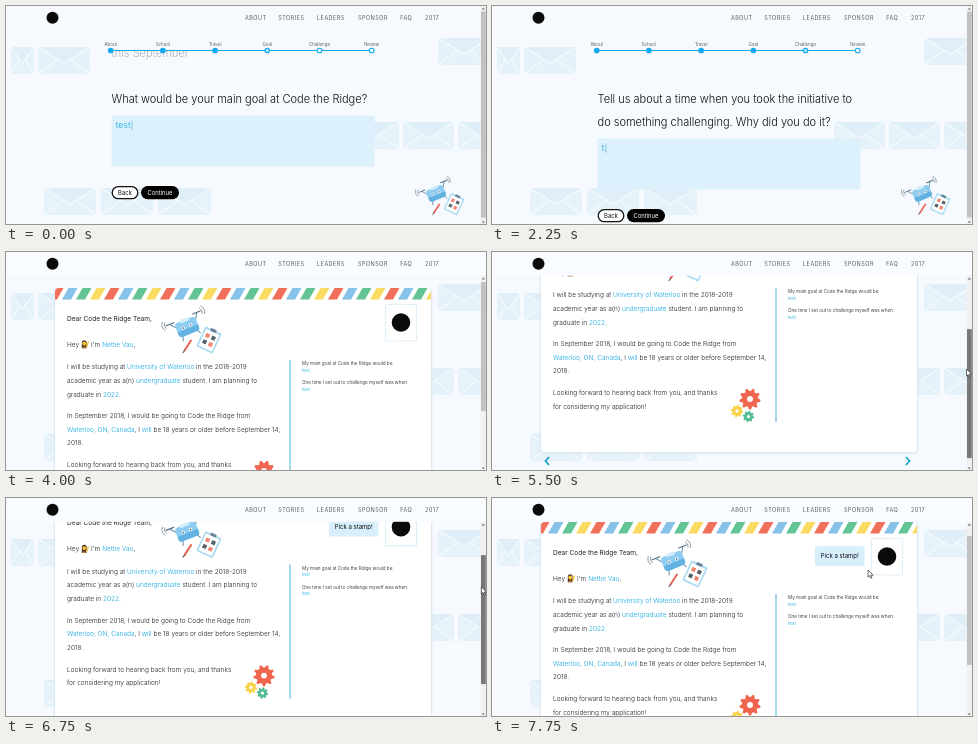
Recreate the animation shown at these times as an HTML page. Size 480x218 px, loop 8 s.

```html
<!DOCTYPE html>
<html lang="en">
<head>
<meta charset="utf-8">
<title>Application form</title>
<style>
  html, body { margin: 0; width: 100%; height: 100%; overflow: hidden; background: #f6faff; }
  svg { display: block; width: 100%; height: 100%; }
  text { font-family: Inter, Roboto, sans-serif; font-weight: 300; fill: #0c0e10; white-space: pre; }
  .q { font-size: 11.03px; }
  .nav { font-size: 5.5px; letter-spacing: .5px; fill: #2c3035; }
  .step { font-size: 4.5px; text-anchor: middle; fill: #333; }
  .field { font-size: 8.8px; }
  .hint { fill: #7f898f; }
  .btn { font-size: 5.9px; font-weight: 400; text-anchor: middle; }
  .body { font-size: 6.54px; fill: #1c1f22; }
  .note { font-size: 4.68px; }
  .strong { font-weight: 400; }
  .b { fill: #12a5e0; }
</style>
</head>
<body>
<svg viewBox="0 0 480 218">
  <defs>
    <clipPath id="below"><rect y="43.5" width="480" height="180"/></clipPath>
    <clipPath id="cardTop"><path d="M49 48V40a4 4 0 0 1 4-4H421a4 4 0 0 1 4 4v8z"/></clipPath>
    <g id="drone" stroke-linecap="round" stroke-linejoin="round">
      <g transform="rotate(-22)">
        <path d="M-10-2L-15-8M10-2L14-9M-7 7L-9 12M8 7L10 11" stroke="#6a8fa6" stroke-width="1" fill="none"/>
        <rect x="-11" y="-7" width="22" height="15" rx="3.5" fill="#8fcdf0"/>
        <path d="M-11 2H11v2.5a3.5 3.5 0 0 1-3.5 3.5H-7.5a3.5 3.5 0 0 1-3.5-3.5z" fill="#62b3e2"/>
        <rect x="-5" y="-8.5" width="10" height="3.5" rx="1.7" fill="#d3edfb"/>
        <circle cx="-4" r="1.7" fill="#fff"/><circle cx="4" r="1.7" fill="#fff"/>
        <circle cx="-4" r=".8" fill="#35586d"/><circle cx="4" r=".8" fill="#35586d"/>
        <path d="M-19-8.5H-11M10-9.5H18" stroke="#4f7085" stroke-width="1.2"/>
        <path d="M-20-5.5Q-22-8.5-19.5-11.5M-22-4.5Q-25-8.5-21.5-13M19-6.5Q21-9.5 18.5-12.5M21-5.5Q24-9.5 20.5-14" stroke="#5d6a72" stroke-width=".6" fill="none"/>
      </g>
      <g transform="translate(22 13.5) rotate(25)">
        <rect x="-9" y="-11" width="18" height="22" rx="1.3" fill="#a9daf0"/>
        <rect x="-7.3" y="-9" width="14.6" height="18.3" fill="#fff"/>
        <rect x="-3.2" y="-12" width="6.4" height="3" rx="1" fill="#688597"/>
        <path d="M-5.2-5.5h4v4h-4zM1.2 1.5h4v4h-4z" fill="#f08570"/>
        <path d="M1.2-5.5h4v4h-4zM-5.2 1.5h4v4h-4z" fill="#56626b"/>
      </g>
      <path d="M4 14L-2.5 24" stroke="#ea6455" stroke-width="2"/>
      <path d="M-2.5 24L-4 26.3" stroke="#444" stroke-width="1"/>
    </g>
  </defs>

  <rect width="480" height="218" fill="#f6faff"/>
  <g id="mail"></g>

  <g id="form">
    <use href="#drone" transform="translate(430 187) scale(.82)"/>
    <g id="goal">
      <text class="q" x="105.5" y="51" opacity=".3" clip-path="url(#below)">this September</text>
      <text class="q" x="105.5" y="97.3">What would be your main goal at Code the Ridge?</text>
    </g>
    <g id="dare">
      <text class="q" x="105.5" y="97.3">Tell us about a time when you took the initiative to</text>
      <text class="q" x="105.5" y="120">do something challenging. Why did you do it?</text>
    </g>
    <g id="entry">
      <rect id="area" x="105.5" width="263" height="51" y="109.5"/>
      <text id="hint" class="field hint" x="112" y="121.6">tell us about a challenge (max 1500 characters)</text>
      <text id="value" class="field b" x="109.8" y="122"></text>
      <path id="caret" stroke="#4aa9d0" stroke-width=".6"/>
      <rect x="106.2" y="180.7" width="25.6" height="12" rx="6" fill="#fff" stroke="#111" stroke-width="1.3"/>
      <text class="btn" x="119" y="188.7">Back</text>
      <rect id="next" x="135" y="180" width="38" height="13.3" rx="6.6"/>
      <text class="btn" x="154" y="188.7" style="fill:#fff">Continue</text>
    </g>
    <path d="M104.5 44.5H366" stroke="#14aaee" stroke-width="1.2"/>
    <g id="steps"></g>
  </g>

  <g id="letter">
    <g id="page">
      <rect x="47" y="35.5" width="380" height="239" rx="5.5" fill="#dce9f3" opacity=".35"/>
      <rect x="48" y="36" width="378" height="237.5" rx="4.5" fill="#d8e6f0" opacity=".6"/>
      <rect x="49" y="36" width="376" height="236" rx="4" fill="#fff"/>
      <g id="stripes" clip-path="url(#cardTop)"></g>
      <use href="#drone" transform="translate(181 74.5)"/>
      <text class="body strong" x="61" y="68.6">Dear Code the Ridge Team,</text>
      <text class="body" x="61" y="94.6">Hey</text>
      <g>
        <path d="M75.8 96.3v-5.5q0-2.6 2.4-2.6t2.4 2.6v5.5z" fill="#4a352b"/>
        <circle cx="78.2" cy="91.5" r="1.9" fill="#fbc531"/>
        <path d="M76 96.3q2.2-3.4 4.4 0z" fill="#c9803a"/>
        <path d="M80.8 94.8L82.3 90" stroke="#fbc531" stroke-width="1.3" stroke-linecap="round"/>
      </g>
      <text class="body" x="85" y="94.6">I'm <tspan class="b">Nettie Vau</tspan>,</text>
      <text class="body" x="61" y="117.3">I will be studying at <tspan class="b">University of Waterloo</tspan> in the 2018-2019</text>
      <text class="body" x="61" y="130.9">academic year as a(n) <tspan class="b">undergraduate</tspan> student. I am planning to</text>
      <text class="body" x="61" y="144.5">graduate in <tspan class="b">2022</tspan>.</text>
      <text class="body" x="61" y="166.2">In September 2018, I would be going to Code the Ridge from</text>
      <text class="body" x="61" y="179.8"><tspan class="b">Waterloo, ON, Canada</tspan>, I <tspan class="b">will</tspan> be 18 years or older before September 14,</text>
      <text class="body" x="61" y="193.4">2018.</text>
      <text class="body" x="61" y="215.3">Looking forward to hearing back from you, and thanks</text>
      <text class="body" x="61" y="228.9">for considering my application!</text>
      <path d="M284 108V242" stroke="#84cde0" stroke-width="1.5"/>
      <text class="note" x="296" y="113.2">My main goal at Code the Ridge would be:</text>
      <text class="note b" x="296" y="119.7">test</text>
      <text class="note" x="296" y="132.3">One time I set out to challenge myself was when:</text>
      <text class="note b" x="296" y="138.8">test</text>
      <g id="gears"></g>
      <rect x="379.5" y="52.5" width="31" height="36.5" fill="#fff" stroke="#cfe6f5" stroke-width="1.2" stroke-dasharray="1.6 .9"/>
      <circle cx="395" cy="70.5" r="9.3" fill="#0b0b0b"/>
      <g id="tip">
        <rect x="323" y="60.3" width="49.5" height="19.7" rx="1.5" fill="#d9eefb"/>
        <text class="strong" x="347.8" y="72.3" font-size="6" text-anchor="middle">Pick a stamp!</text>
      </g>
      <path d="M57 277l-3.5 4 3.5 4M414 277l3.5 4-3.5 4" fill="none" stroke="#22a3c8" stroke-width="1.8"/>
    </g>
    <rect width="480" height="23.8" fill="#f8fbff"/>
  </g>

  <circle cx="46.5" cy="11.8" r="6" fill="#0b0b0b"/>
  <g id="nav"></g>

  <g id="bar">
    <rect id="track" x="474.6" width="5.4" fill="#f1f1f1"/>
    <rect id="thumb" x="475" width="4.8"/>
    <path id="up" d="M475.8 3.6h3l-1.5-1.8z" fill="#666"/>
    <path d="M475.8 215.4h3l-1.5 1.8z" fill="#666"/>
  </g>
  <path id="arrow" d="M0 0V7.2L1.7 5.7 2.8 8.3l1.2-.5L2.9 5.2H5.1z" fill="#fff" stroke="#111" stroke-width=".6"/>
  <path id="hand" d="M-.8 0q.8-1 1.6 0V3.2L3.6 4V6.4L2.6 9H-1.4L-3.2 5.6l.8-.8 1.6 1z" fill="#fff" stroke="#111" stroke-width=".6"/>
</svg>
<script>
const LOOP = 8000, TICK = 250;
const $ = id => document.getElementById(id);
const set = (id, attrs) => { for (const k in attrs) $(id).setAttribute(k, attrs[k]); };
const show = (id, on) => { $(id).style.display = on ? '' : 'none'; };
const move = (id, x, y) => set(id, { transform: `translate(${x} ${y})` });

// Linear interpolation through [time, value] points.
function key(points, t) {
  if (t <= points[0][0]) return points[0][1];
  for (let i = 1; i < points.length; i++) {
    const [a, u] = points[i - 1], [b, v] = points[i];
    if (t <= b) return u + (v - u) * (t - a) / (b - a);
  }
  return points[points.length - 1][1];
}

function envelope([x, y, w]) {
  const h = 27, c = x + w / 2, m = y + h * .6;
  return `<rect x="${x}" y="${y}" width="${w}" height="${h}" fill="#e6f2fa"/>
    <path d="M${x} ${y}H${x + w}L${c} ${m}z" fill="#e0eef7"/>
    <path d="M${x} ${y}L${c} ${m} ${x + w} ${y}M${x} ${y + h}L${c - w * .12} ${y + h * .46}M${x + w} ${y + h}L${c + w * .12} ${y + h * .46}"
      fill="none" stroke="#f6fbff" stroke-width="1.1"/>`;
}

function gear(x, y, r, teeth, color) {
  let d = '';
  for (let i = 0; i < teeth * 4; i++) {
    const a = (i + .5) * Math.PI / teeth / 2, q = i % 4 < 2 ? r : r * .76;
    d += `${i ? 'L' : 'M'}${(x + q * Math.cos(a)).toFixed(2)} ${(y + q * Math.sin(a)).toFixed(2)}`;
  }
  return `<path d="${d}z" fill="${color}"/><circle cx="${x}" cy="${y}" r="${r * .28}" fill="#fff"/>`;
}

const stepNames = ['About', 'School', 'Travel', 'Goal', 'Challenge', 'Review'];
const stepX = i => 104.7 + i * 52.2;

$('mail').innerHTML = [
  [5, 41, 23], [32, 41, 52], [432, 32, 52], [342, 116, 51], [397, 116, 51],
  [452, 116, 51], [38, 182, 52], [95, 182, 52], [152, 182, 53]
].map(envelope).join('');

$('steps').innerHTML = stepNames.map((s, i) =>
  `<text class="step" x="${stepX(i)}" y="39.6">${s}</text>
   <circle id="dot${i}" cx="${stepX(i)}" cy="44.5" r="2.3" stroke="#14aaee" stroke-width="1.1"/>`).join('');

$('nav').innerHTML = [['ABOUT', 239], ['STORIES', 272.3], ['LEADERS', 311], ['SPONSOR', 352], ['FAQ', 394.3], ['2017', 419]]
  .map(([s, x]) => `<text class="nav" x="${x}" y="13.8">${s}</text>`).join('');

const inks = ['#f0705c', '#86c1e8', '#63c596', '#fadb62'];
$('stripes').innerHTML = Array.from({ length: 30 }, (_, i) =>
  `<path d="M${42 + i * 14} 47.5l6.5-11.5h9l-6.5 11.5z" fill="${inks[i % 4]}"/>`).join('');

$('gears').innerHTML = gear(258, 219, 10.6, 9, '#f0654d') + gear(245, 231, 6.2, 8, '#f9d24a') + gear(256.5, 236.5, 5.8, 8, '#55bd93');

const scrollKeys = [[4500, 0], [5500, 72], [6000, 63], [7250, 27], [7500, 19], [7750, 12]];
const mouseX = [[4250, 420], [4500, 462], [4750, 476], [6000, 473.5], [7250, 476.5], [7500, 430], [7750, 376]];
const mouseY = [[4250, 72], [4750, 72], [5500, 117], [6000, 111], [7250, 74], [7750, 72]];

// Draws the question page and returns how far it still has to slide.
function drawForm(t) {
  const second = t >= 1000;
  const slide = second ? key([[1000, 24], [1250, 5.5], [1500, 0]], t) : 0;
  const sent = t === 750 || t >= 3500;
  const text = second ? 'test'.slice(0, Math.max(0, (t - 2000) / TICK)) : 'test';
  const opacity = t === 1000 ? .5 : 1;

  show('goal', !second);
  show('dare', second);
  move('dare', 0, slide);
  move('entry', 0, second ? 23 + slide : 0);
  set('dare', { opacity });
  set('entry', { opacity });
  set('area', { fill: sent ? '#e3e8ef' : '#dcf1fc' });
  set('next', { fill: sent ? '#3f5262' : '#000' });
  $('value').textContent = text;
  show('hint', !text);
  set('caret', { d: `M${110 + text.length * 4} 114.3v9.5` });
  show('caret', t === 0 || t === 1250 || t >= 1750 && t <= 2750);
  const now = second ? 4 : 3;
  stepNames.forEach((_, i) =>
    set('dot' + i, { fill: i < now ? '#14aaee' : i === now ? '#a5def9' : '#fff' }));
  return slide;
}

function drawLetter(t) {
  const y = key(scrollKeys, t);
  move('page', 0, -y);
  show('tip', t >= 4250);
  set('letter', { opacity: t < 4000 ? .5 : 1 });
  return y;
}

function drawBar(letter, offset, t) {
  const drag = t >= 4750 && t < 7500;
  const top = letter ? 23.8 : 0;
  set('track', { y: top, height: 218 - top });
  set('thumb', letter
    ? { y: 30 + offset * .655, height: 129, fill: drag ? '#787878' : '#c1c1c1' }
    : { y: 5.5, height: 206 - offset * 5, fill: '#c1c1c1' });
  move('up', 0, top);
}

function drawMouse(t) {
  const hand = t === 750 || t === 3250 || t === 3500;
  show('hand', hand);
  show('arrow', t >= 250 && t <= 1500 && !hand || t >= 4250);
  move('hand', 151, t === 750 ? 185 : t === 3250 ? 203 : 206);
  if (t >= 4250) move('arrow', key(mouseX, t), key(mouseY, t));
  else move('arrow', key([[500, 125.5], [1000, 165], [1250, 186]], t), key([[500, 182.5], [1000, 160], [1250, 122]], t));
}

function draw(ms) {
  const t = Math.floor(ms % LOOP / TICK) * TICK;
  const letter = t >= 3750;
  show('form', !letter);
  show('letter', letter);
  drawBar(letter, letter ? drawLetter(t) : drawForm(t), t);
  drawMouse(t);
}

const start = performance.now();
function loop() {
  draw(performance.now() - start);
  requestAnimationFrame(loop);
}
loop();
</script>
</body>
</html>
```
